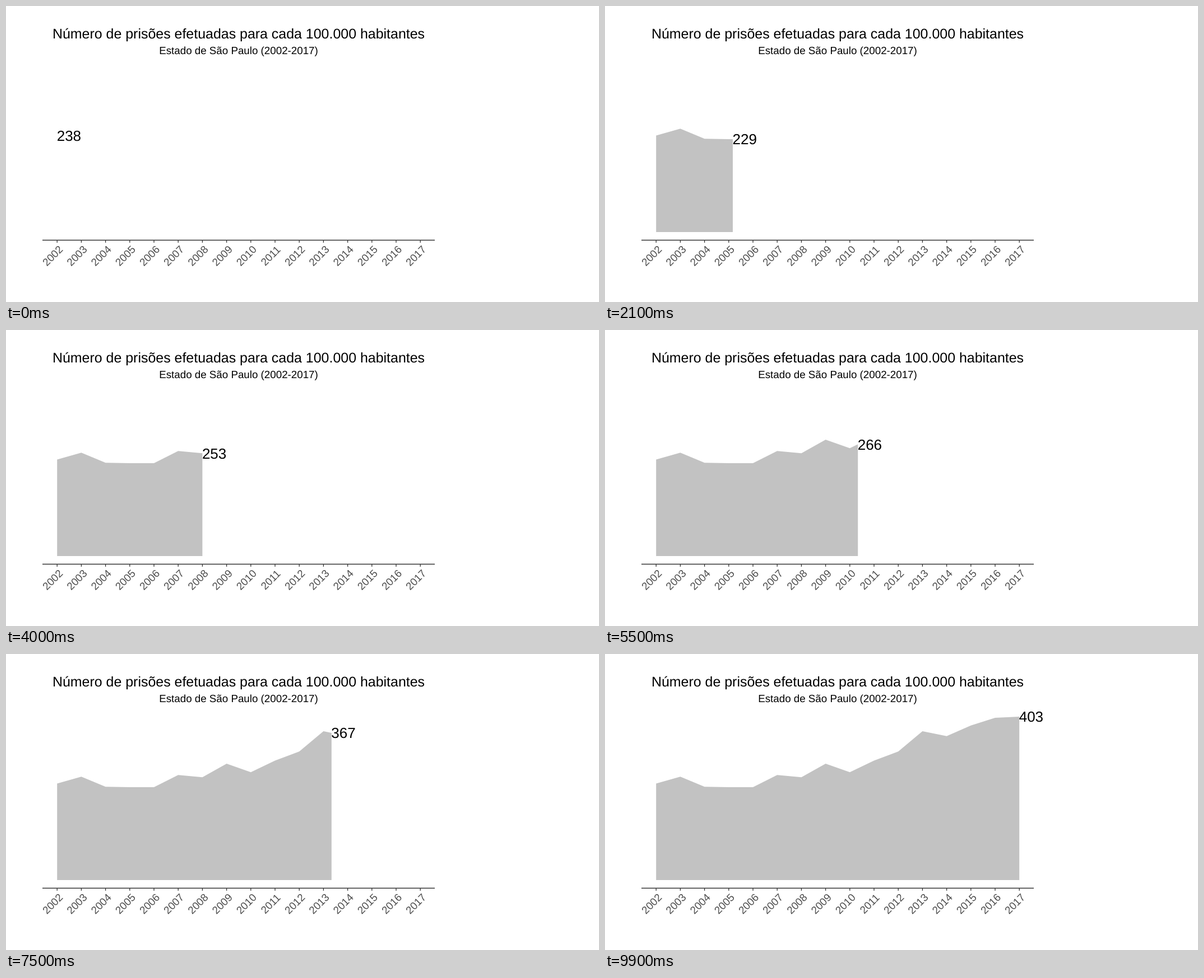
These frames come from a looping animation (1058x529 px, 10 s). An HTML page:

```html
<!DOCTYPE html>
<html lang="pt-BR">
<head>
<meta charset="utf-8">
<title>Prisões por 100.000 habitantes</title>
<style>
  html, body { margin: 0; width: 100%; height: 100%; overflow: hidden; background: #fff; }
  svg { display: block; width: 100vw; height: 100vh; }
  text { font-family: "Liberation Sans", Arial, sans-serif; text-rendering: geometricPrecision; }
</style>
</head>
<body>
<svg id="chart" viewBox="0 0 1058 529">
  <text x="415" y="58" font-size="24.95" text-anchor="middle">Número de prisões efetuadas para cada 100.000 habitantes</text>
  <text x="415" y="86" font-size="18.75" text-anchor="middle">Estado de São Paulo (2002-2017)</text>
  <path id="area" fill="#c2c2c2"/>
  <g id="axis" stroke-width="1.3"><path d="M65 418.5H765" stroke="#333"/></g>
  <text id="label" font-size="26"></text>
</svg>
<script>
const values = [238, 255, 230, 229, 229, 259, 253.4, 287, 266, 294.4, 317, 367, 355, 381, 400, 403];
const STEP = 100, STEPS = 100, BASE = 404;
const last = values.length - 1;
const xAt = i => 91.2 + 43.2 * i;
const yAt = v => BASE - 0.7248 * v;
// Each year lands on a whole step
const keyStep = i => Math.round(i * (STEPS - 1) / last);

const area = document.getElementById('area');
const label = document.getElementById('label');
const axis = document.getElementById('axis');

function add(tag, attrs, content = '') {
  const el = document.createElementNS('http://www.w3.org/2000/svg', tag);
  for (const name in attrs) el.setAttribute(name, attrs[name]);
  el.textContent = content;
  axis.append(el);
}

values.forEach((_, i) => {
  const x = xAt(i);
  add('path', { d: `M${x} 419V423`, stroke: '#333' });
  add('text', {
    transform: `translate(${x - 8} 446.3) rotate(-45)`,
    y: 6.6, 'font-size': 18.75, 'text-anchor': 'middle', fill: '#4d4d4d'
  }, 2002 + i);
});

function draw(ms) {
  const step = Math.floor(ms / STEP) % STEPS;
  let i = 0;
  while (i < last && keyStep(i + 1) <= step) i++;
  const next = Math.min(i + 1, last);
  const part = i < last ? (step - keyStep(i)) / (keyStep(next) - keyStep(i)) : 0;
  const x = xAt(i + part);
  const y = yAt(values[i] + (values[next] - values[i]) * part);

  const points = values.slice(0, i + 1).map((v, k) => [xAt(k), yAt(v)]);
  points.push([x, y], [x, BASE], [xAt(0), BASE]);
  area.setAttribute('d', step ? 'M' + points.join('L') + 'Z' : '');

  label.setAttribute('x', x - 0.5);
  label.setAttribute('y', y + 9.3);
  label.textContent = Math.round(values[part < 0.5 ? i : next]);
}

const start = performance.now();
function tick() {
  draw(performance.now() - start);
  requestAnimationFrame(tick);
}
tick();
</script>
</body>
</html>
```
